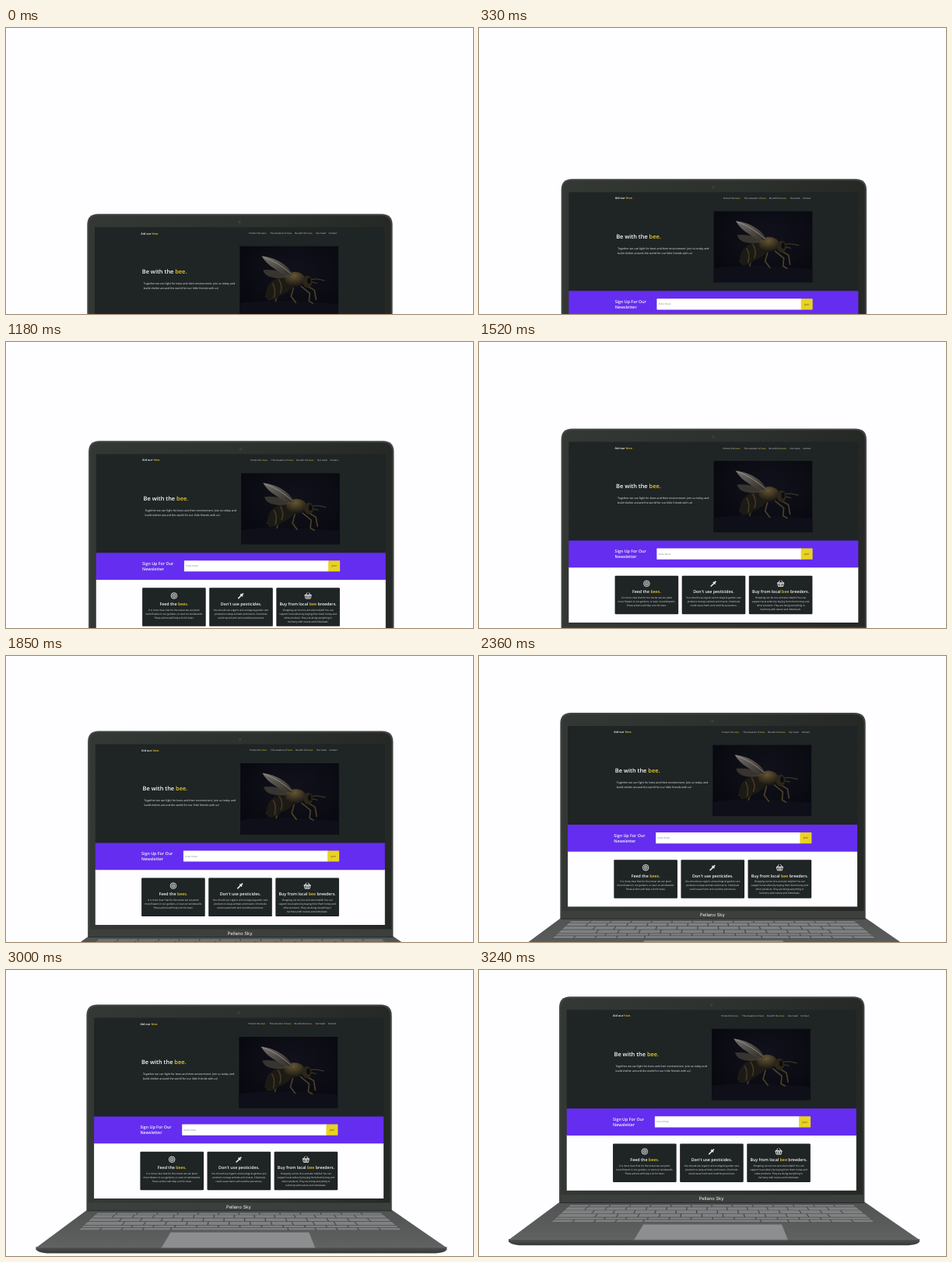
An HTML page for the animation above (3270 ms loop, 600 px wide and 368 px high).

```html
<!DOCTYPE html>
<html lang="en">
<head>
<meta charset="utf-8">
<title>Laptop reveal</title>
<style>
  html, body { margin: 0; height: 100%; overflow: hidden; background: #fefdff; }
  svg { display: block; width: 100vw; height: 100vh; }
  text { font-family: "Open Sans", "Noto Sans", sans-serif; fill: #fafafa; text-rendering: geometricPrecision; white-space: pre; }
  .bold { font-weight: 600; }
  .mid { text-anchor: middle; }
  .y { fill: #e8cd2c; }
</style>
</head>
<body>
<svg viewBox="0 0 600 368">
  <defs>
    <linearGradient id="bezel"><stop stop-color="#343834"/><stop offset=".6" stop-color="#2d312d"/><stop offset="1" stop-color="#252824"/></linearGradient>
    <linearGradient id="deck" x2="0" y2="1"><stop stop-color="#515353"/><stop offset="1" stop-color="#606262"/></linearGradient>
    <linearGradient id="lip" x2="0" y2="1"><stop stop-color="#505252"/><stop offset="1" stop-color="#353737"/></linearGradient>
    <radialGradient id="night" cx=".55" cy=".35" r=".75"><stop stop-color="#10111b"/><stop offset="1" stop-color="#07080e"/></radialGradient>
    <linearGradient id="wing" x2="1" y2="1"><stop stop-color="#74716f"/><stop offset="1" stop-color="#2f2a22"/></linearGradient>
    <radialGradient id="fur" cx=".45" cy=".25" r=".7"><stop stop-color="#665633"/><stop offset="1" stop-color="#1d1a14"/></radialGradient>
    <filter id="soft"><feGaussianBlur stdDeviation=".6"/></filter>
  </defs>

  <g id="laptop">
    <!-- base -->
    <path d="M104 298H495L566 347H38Z" fill="url(#deck)"/>
    <path d="M38 346H566V349Q565 353 552 354H52Q40 353 38 349Z" fill="url(#lip)"/>
    <path d="M38 346.3H566" stroke="#747676" stroke-width=".6"/>
    <g id="keys"></g>
    <path d="M211 327H389L397 347H199Z" fill="#8c8e8f" stroke="#6a6c6c" stroke-width=".6"/>

    <!-- lid -->
    <path d="M103 299V48Q103 34 117 34H481Q495.3 34 495.3 48V299Z" fill="#3f4440"/>
    <path d="M105 298V49Q105 36 118 36H480Q493.3 36 493.3 49V298Z" fill="url(#bezel)"/>
    <path d="M104 289H494V299H104Z" fill="#3c403d"/>
    <path d="M104 299.3H495" stroke="#262828" stroke-width="1"/>
    <circle cx="298.5" cy="44.5" r="1.5" fill="#4b4f4c"/>
    <circle cx="298.5" cy="44.5" r=".7" fill="#232725"/>
    <text class="mid" x="298.5" y="296.2" font-size="5.8" style="font-family:Inter,sans-serif">Pellano Sky</text>

    <!-- web page -->
    <path d="M112.7 51H484.7V179H112.7Z" fill="#1f2425"/>
    <path d="M112.7 212H484.7V283.5H112.7Z" fill="#fefdff"/>
    <path d="M112.7 178H484.7V212.8H112.7Z" fill="#652df0"/>
    <g id="page"></g>

    <!-- hero picture -->
    <path d="M299 75.5H425.7V167H299Z" fill="url(#night)"/>
    <path d="M299 149Q340 142 425.7 150V167H299Z" fill="#0e0f18"/>
    <g filter="url(#soft)">
      <g fill="none" stroke="#4b4028" stroke-width="1.7" stroke-linecap="round" stroke-linejoin="round">
        <path d="M361 127L349 134L345 146M368 129L365 140L371 148M378 127L389 136L388 146L393 149M354 124L338 128L333 140M383 125L395 132L397 144"/>
        <path d="M390 118L398 117.5L408 119.5M389 121L398 123" stroke-width="1"/>
      </g>
      <path d="M365 112Q346 114 337 124Q329 136 335 145Q344 146 351 139Q364 134 369 125Z" fill="#1c1a15"/>
      <path d="M341 123Q346 130 343 142M349 118Q355 127 351 136" fill="none" stroke="#443a22" stroke-width="1.6"/>
      <ellipse cx="370" cy="118" rx="13" ry="9.5" fill="url(#fur)"/>
      <ellipse cx="386" cy="121" rx="6" ry="7.5" fill="#2b2619"/>
      <ellipse cx="388" cy="120" rx="2.2" ry="4" fill="#0c0c0b"/>
      <path d="M327 88Q344 90 356 99Q365 106 367 113Q352 112 343 104Q333 98 327 88Z" fill="url(#wing)"/>
      <path d="M329 106Q346 104 365 114Q350 119 338 115Q330 112 329 106Z" fill="#4a453b" opacity=".7"/>
      <path d="M329 89Q350 97 366 112" fill="none" stroke="#aaa49a" stroke-width=".7"/>
    </g>

    <!-- card icons -->
    <g fill="none" stroke="#f1f1f1" stroke-width=".9">
      <circle cx="212.8" cy="233.3" r="3.8"/><circle cx="212.8" cy="233.3" r="2"/><circle cx="212.8" cy="233.3" r=".5"/>
      <path d="M295.2 237L299.3 232.9" stroke-width="1.5"/>
      <path d="M298.2 231.2L301 234M299.8 232.4L301.9 230.3" stroke-width="1.6"/>
      <path d="M381 232.7H389L388 236.9H382ZM380.5 232.5H389.5M382 232.3L384 229.3M388 232.3L386 229.3M383.5 233.3V236.3M385 233.3V236.3M386.5 233.3V236.3"/>
    </g>
  </g>
</svg>

<script>
const $ = id => document.getElementById(id);
const page = [];

// *word* marks yellow text
const text = (x, y, size, str, cls = '', fill = '') =>
  page.push(`<text x="${x}" y="${y}" font-size="${size}" class="${cls}"${fill && ` style="fill:${fill}"`}>` +
    str.replace(/\*(.+?)\*/g, '<tspan class="y">$1</tspan>') + '</text>');
const box = (x, y, w, h, fill, r = 0) =>
  page.push(`<rect x="${x}" y="${y}" width="${w}" height="${h}" rx="${r}" fill="${fill}"/>`);

text(172, 60.2, 3.8, 'Aid our *hive.*', 'bold');
[[311, 'Protect the *bees*'], [338, 'The situation of *bees*'], [370, 'Be with the *bees*'],
 [397, 'Our team'], [413.3, 'Contact']].forEach(([x, s]) => text(x, 60, 2.9, s, '', '#d4d6d6'));
text(173.5, 110.7, 7.4, 'Be with the *bee.*', 'bold');
text(175.5, 124.6, 3.52, 'Together we can fight for bees and their environment. Join us today and', '', '#eceeee');
text(175.5, 130.8, 3.52, 'build shelter around the world for our little friends with us!', '', '#eceeee');

text(172, 193.8, 5.3, 'Sign Up For Our', 'bold');
text(172, 200.8, 5.3, 'Newsletter', 'bold');
box(225.8, 188, 186, 14.2, '#ffffff', .6);
box(411, 188, 15, 14.2, '#e9d322', .6);
text(228.2, 196.2, 2.9, 'Enter Email', '', '#777777');
text(418.5, 196.3, 3.2, 'Join!', 'mid', '#333322');

[
  [172, 'Feed the *bees.*', [
    'It is more clear that for the nectar we can plant',
    'more flowers in our gardens, or even on windowsills.',
    'These actions will help a lot for bees.']],
  [258.1, "Don't use pesticides.", [
    'You should use organic and ecological garden care',
    'products to keep animals and insects. Chemicals',
    'could cause harm and could be poisonous.']],
  [344.2, 'Buy from local *bee* breeders.', [
    'Shopping can be nice and also helpful! You can',
    'support local sellers by buying from them honey and',
    'other products. They are doing everything in',
    'harmony with nature and individuals.']]
].forEach(([x, title, lines]) => {
  const mid = x + 40.8;
  box(x, 223.2, 81.6, 49.5, '#1f2425', 1.2);
  text(mid, 245.8, 5.3, title, 'bold mid');
  lines.forEach((s, i) => text(mid, 252.5 + i * 5, 3, s, 'mid', '#f2f4f4'));
});
$('page').innerHTML = page.join('');

// keyboard in perspective: u runs 0..1 across the row at height y
const keyX = (u, y) => {
  const d = y - 301.5, left = 117 - d * 1.09, right = 481 + d * 1.22;
  return left + (right - left) * u;
};
const quad = (u0, u1, y0, y1, fill) =>
  `<path d="M${keyX(u0, y0)} ${y0}L${keyX(u1, y0)} ${y0}L${keyX(u1, y1)} ${y1}L${keyX(u0, y1)} ${y1}Z" fill="${fill}"/>`;
const rows = [
  [302, 304.2, Array(14).fill(1)],
  [304.9, 308.4, [...Array(13).fill(1), 1.5]],
  [309.1, 312.9, [1.5, ...Array(13).fill(1)]],
  [313.6, 317.6, [1.8, ...Array(11).fill(1), 1.8]],
  [318.3, 320.6, [2.3, ...Array(10).fill(1), 2.3]],
  [321.2, 324, [1, 1, 1, 1.3, 5.5, 1.3, 1, 1, 1, 1]]
];
let keys = quad(0, 1, 301.3, 324.6, '#484a4a');
for (const [y0, y1, widths] of rows) {
  const total = widths.reduce((a, b) => a + b);
  let u = 0;
  for (const w of widths) {
    keys += quad(u + .0018, u + w / total - .0018, y0, y1, '#7f8182');
    u += w / total;
  }
}
$('keys').innerHTML = keys;

// time, vertical offset, horizontal offset
const track = [[0, 205.5, 1.3], [640, 118, 3.9], [2730, 22, .8], [3270, -1, 0]];
const start = performance.now();

function draw(now) {
  const t = Math.max(0, now - start) % 3270;
  const i = track.findIndex(p => p[0] > t);
  const a = track[i - 1], b = track[i], k = (t - a[0]) / (b[0] - a[0]);
  const y = a[1] + (b[1] - a[1]) * k, x = a[2] + (b[2] - a[2]) * k;
  $('laptop').setAttribute('transform', `translate(${x} ${y})`);
  requestAnimationFrame(draw);
}
draw(start);
</script>
</body>
</html>
```
